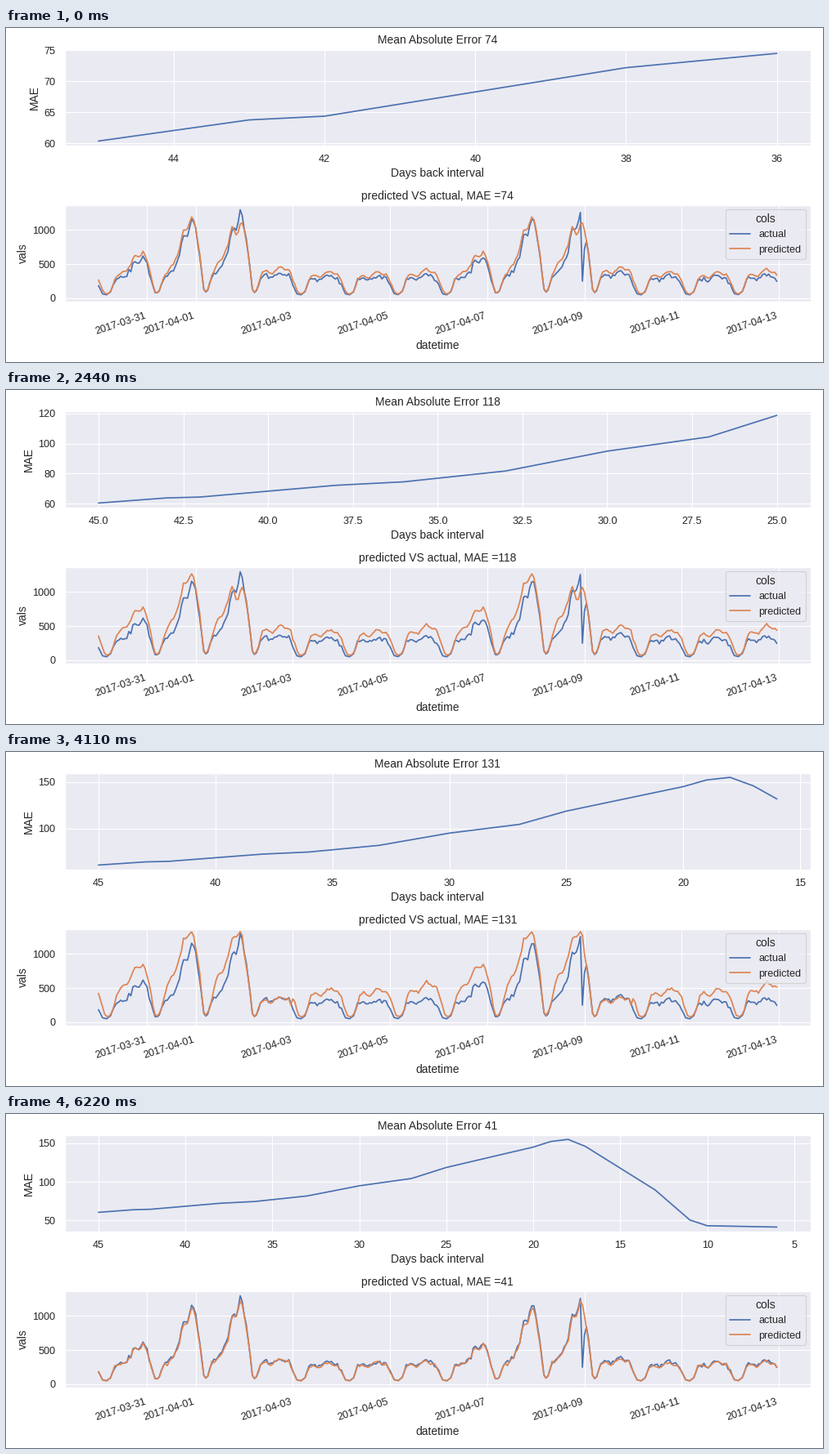
A matplotlib script that plays this animation: 998 by 409 pixels, repeating every 6.45 s.

```python
import matplotlib.pyplot as plt
import numpy as np
from matplotlib.animation import FuncAnimation

W, H, DPI = 998, 409, 64
LOOP, STEP = 6450, 50
BLUE, ORANGE, PANEL, INK = "#4C72B0", "#DD8452", "#EAEAF2", "#262626"
S = 83 / DPI  # point sizes below are meant for 83 dpi

sizes = {
    "axes.titlesize": 12, "axes.labelsize": 12, "legend.title_fontsize": 12,
    "xtick.labelsize": 11, "ytick.labelsize": 11, "legend.fontsize": 11,
    "axes.linewidth": 1.25, "grid.linewidth": 1, "lines.linewidth": 1.5,
    "patch.linewidth": 1, "axes.titlepad": 6, "axes.labelpad": 4,
    "xtick.major.size": 6, "ytick.major.size": 6,
    "xtick.major.pad": 3.5, "ytick.major.pad": 3.5,
}
plt.rcParams.update({key: v * S for key, v in sizes.items()})
plt.rcParams.update({
    "font.family": "Liberation Sans", "text.color": INK,
    "axes.labelcolor": INK, "xtick.color": INK, "ytick.color": INK,
    "axes.facecolor": PANEL, "axes.edgecolor": "white",
    "axes.grid": True, "grid.color": "white", "axes.axisbelow": True,
    "xtick.bottom": False, "ytick.left": False,
    "lines.solid_capstyle": "round",
})

FIRST, LAST = 36, 6
DAYS = np.arange(45, LAST - 1, -1)


def curve(x, points, **kw):
    return np.interp(x, *zip(*points), **kw)


# Error by days back, at its bends
BENDS = [(6, 41.3), (10, 43), (11, 50.5), (13, 89.6), (17, 146), (18, 155.2),
         (19, 152.4), (20, 145.2), (25, 118.7), (27, 104.4), (30, 94.9),
         (33, 81.7), (36, 74.5), (38, 72.2), (42, 64.4), (43, 63.8), (45, 60.4)]
mae = curve(DAYS, BENDS)

# Load by hour: a plain day, plus an evening burst that runs past midnight
PLAIN = [(0, 190), (2, 65), (4, 50), (6, 95), (8, 260), (10, 290),
         (13, 255), (17, 340), (20, 300), (22, 295)]
BURST = [(10, 0), (16, .3), (18, .63), (20, .66), (22.5, 1),
         (24, .85), (26, .6), (28, .08), (29, 0)]
BROAD = [(9, 0), (12, .25), (16, .5), (18, .76), (20, .85), (22.5, 1),
         (24, .75), (26, .6), (28, .05), (29, 0)]
LEVEL = [1, 1.1, 1.25, 1.15, 1, 1, 1.05]  # Thursday to Wednesday
SAT = 2
rng = np.random.default_rng(4)


def make_week(gain, delay, shape, bursts):
    t = np.arange(168)
    v = gain * np.repeat(LEVEL, 24) * curve(t - delay, PLAIN, period=24)
    for day, size in enumerate(bursts):
        v += size * curve((t - 24 * day) % 168, shape)
    return v


def wiggle(v, amount):
    busy = np.clip((v - 120) / 120, 0, 1)
    return v + busy * rng.normal(0, amount, v.shape)


load = make_week(1, 0, BURST, [340, 900, 960])
actual = wiggle(np.tile(load, 2), 17)
actual[239:241] = 250, 720  # sensor dropout

low = wiggle(.97 * load, 12).reshape(7, 24)
high = wiggle(make_week(1.5, .8, BROAD, [400, 870, 790, 0, 0, 0, 80]), 12)
high = high.reshape(7, 24)
steep = high[SAT].copy()
high[SAT] -= 470 * np.exp(-((np.arange(24) - 21) / 2.5) ** 2)
BLEND = [.35, .45, .72, 1, 0, 0]  # share of high after each refresh


def forecast(back):
    """Each day back refreshes one weekday, in turn from Saturday."""
    week = np.empty((7, 24))
    for d in range(7):
        gen = (38 - (d - SAT) % 7 - back) // 7
        mix = BLEND[gen + 1]
        week[d] = mix * high[d] + (1 - mix) * low[d]
        if d == SAT and gen == 3:
            week[d] = steep
    return np.tile(week.ravel(), 2)


fig = plt.figure(figsize=(W / DPI, H / DPI), dpi=DPI, facecolor="white")


def panel(top, bottom, **labels):
    left, right = 71.5, 983
    ax = fig.add_axes([left / W, 1 - bottom / H,
                       (right - left) / W, (bottom - top) / H])
    ax.set(**labels)
    return ax, ax.set_title("")


ax1, title1 = panel(25.7, 143.8, xlabel="Days back interval", ylabel="MAE")
err_line, = ax1.plot([], [], color=BLUE)

ax2, title2 = panel(217, 335.2, xlabel="datetime", ylabel="vals")
hours = np.datetime64("2017-03-30T00") + np.arange(336)
ax2.plot(hours, actual, color=BLUE, label="actual")
pred_line, = ax2.plot(hours, forecast(FIRST), color=ORANGE, label="predicted")
ax2.set_ylim(-52, 1365)
ax2.set_xlim(ax2.get_xlim())
plt.setp(ax2.get_xticklabels(), rotation=18, ha="right")
ax2.legend(title="cols", loc="upper right", bbox_to_anchor=(1, 1.012),
           facecolor=PANEL, edgecolor="0.8", framealpha=0.8)


def draw(i):
    t = (i + 1) * STEP - 1
    tick = (t + 5) * 9 // 1000  # the picture steps nine times a second
    back = max(LAST, FIRST - int(tick / 1.845))
    n = 46 - back
    x, y = DAYS[:n], mae[:n]
    err_line.set_data(x, y)
    px, py = 0.05 * np.ptp(x), 0.05 * np.ptp(y)
    ax1.set_xlim(45 + px, back - px)
    ax1.set_ylim(y.min() - py, y.max() + py)
    pred_line.set_ydata(forecast(back))
    title1.set_text(f"Mean Absolute Error {int(y[-1])}")
    title2.set_text(f"predicted VS actual, MAE ={int(y[-1])}")
    return err_line, pred_line, title1, title2


anim = FuncAnimation(fig, draw, frames=LOOP // STEP, interval=STEP, repeat=True)
plt.show()
```
